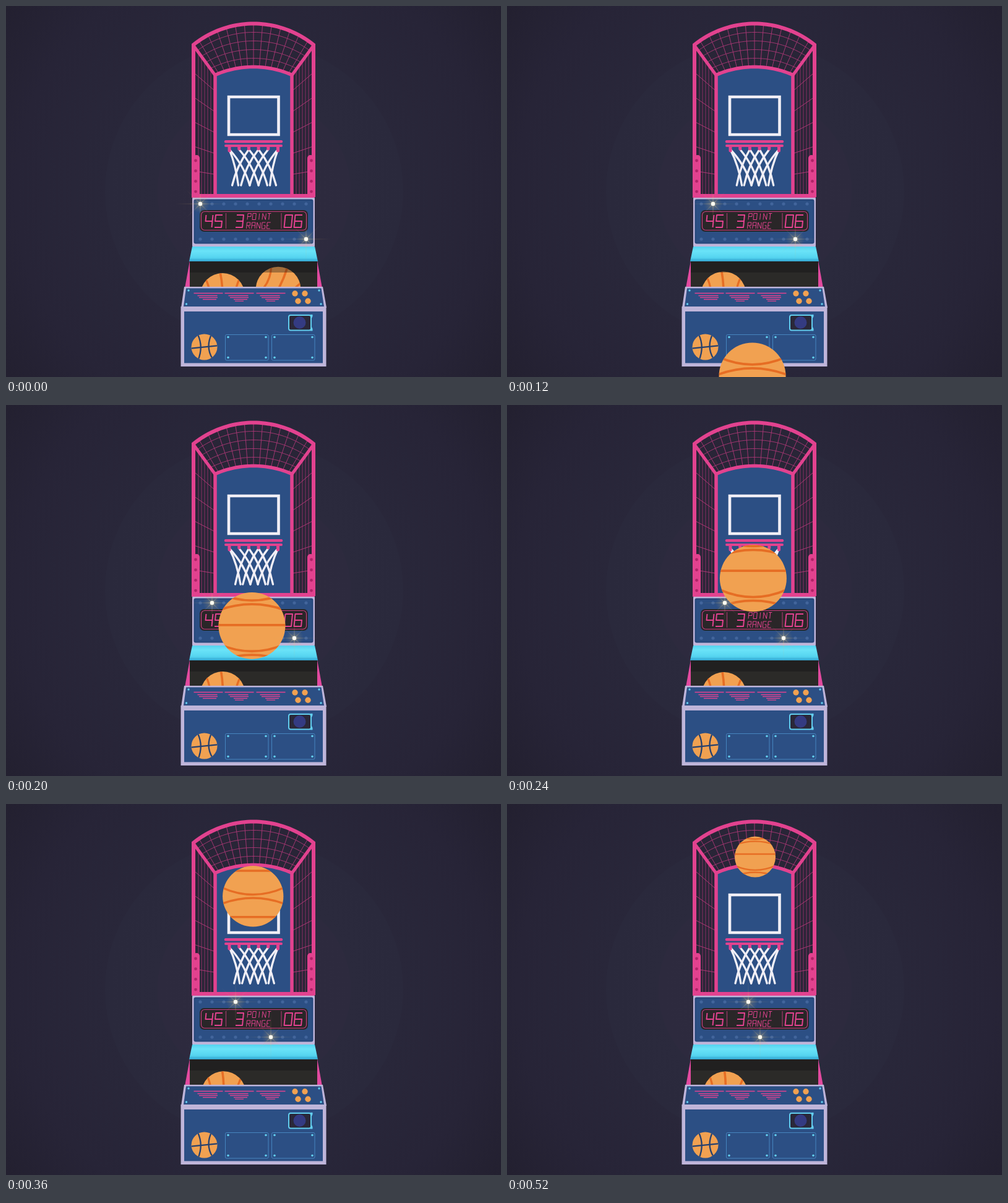
These frames come from a looping animation (800 by 600 pixels, 0.56 s). An HTML page with a canvas:

```html
<!DOCTYPE html>
<html lang="en">
<head>
<meta charset="utf-8">
<title>Arcade hoops</title>
<style>
  html, body { margin: 0; width: 100%; height: 100%; overflow: hidden; background: #242031; }
  canvas { display: block; }
</style>
</head>
<body>
<canvas id="stage" width="800" height="600"></canvas>
<script>
const ctx = document.getElementById('stage').getContext('2d');
const STEP = 40, STEPS = 14, TAU = Math.PI * 2;
const PINK = '#e2428f', BLUE = '#2c4f84', LILAC = '#bfb5da', CYAN = '#62cdee',
      WHITE = '#f1eff6', ORANGE = '#f1a151', SEAM = '#e66d24', DARK = '#2a2839';

const lerp = (a, b, t) => a + (b - a) * t;

// Piecewise linear value through [time, value] keys.
function track(keys, t) {
  const n = keys.findIndex(k => k[0] >= t);
  if (n < 1) return keys[0][1];
  const [t0, v0] = keys[n - 1], [t1, v1] = keys[n];
  return lerp(v0, v1, (t - t0) / (t1 - t0));
}

function stroke(color, width) {
  ctx.strokeStyle = color;
  ctx.lineWidth = width;
  ctx.stroke();
}

function line(points, color, width) {
  ctx.beginPath();
  points.forEach(([x, y]) => ctx.lineTo(x, y));
  stroke(color, width);
}

function poly(points, fill) {
  ctx.beginPath();
  points.forEach(([x, y]) => ctx.lineTo(x, y));
  ctx.closePath();
  ctx.fillStyle = fill;
  ctx.fill();
}

function rect(x, y, w, h, fill) {
  ctx.fillStyle = fill;
  ctx.fillRect(x, y, w, h);
}

function dot(x, y, r, fill) {
  ctx.beginPath();
  ctx.arc(x, y, r, 0, TAU);
  ctx.fillStyle = fill;
  ctx.fill();
}

function box(x, y, w, h, r, fill, border, width) {
  ctx.beginPath();
  ctx.roundRect(x, y, w, h, r);
  if (fill) { ctx.fillStyle = fill; ctx.fill(); }
  if (border) stroke(border, width);
}

function curve(x0, y0, cx, cy, x1, y1, color, width) {
  ctx.beginPath();
  ctx.moveTo(x0, y0);
  ctx.quadraticCurveTo(cx, cy, x1, y1);
  stroke(color, width);
}

// Draws in unit-ball coordinates, clipped to the ball.
function ball(x, y, r, angle, drawSeams) {
  ctx.save();
  ctx.translate(x, y);
  dot(0, 0, r, ORANGE);
  ctx.clip();
  ctx.rotate(angle);
  ctx.scale(r, r);
  drawSeams();
  ctx.restore();
}

function background() {
  const g = ctx.createRadialGradient(401, 300, 0, 401, 300, 500);
  [[0, '#2e2b3f'], [.312, '#2d2a3e'], [.313, '#2b2a3d'], [.481, '#2a293c'],
   [.482, '#29273a'], [.77, '#272437'], [1, '#232030']].forEach(s => g.addColorStop(...s));
  rect(0, 0, 800, 600, g);
}

// Height of the cage roof: s = 0 is the front arch, s = 1 the back arch.
function roof(u, s) {
  const x = u * lerp(97, 62, s), r = 154.5;
  return [400 + x, lerp(183, 253, s) - Math.sqrt(r * r - x * x)];
}

function arch(s) {
  return Array.from({ length: 41 }, (_, n) => roof(n / 20 - 1, s));
}

function cage() {
  const mesh = '#ad3876';
  poly([...arch(0), [497, 308], [303, 308]], '#292537');
  for (let n = -6; n <= 6; n++) line([roof(n / 6.6, 0), roof(n / 6.6, 1)], mesh, .9);
  for (let s = .2; s < .9; s += .2) line(arch(s), mesh, .9);

  for (const side of [-1, 1]) {
    const X = x => 400 + side * (400 - x);
    for (let x = 311; x < 335; x += 5) line([[X(x), 64 + (x - 303) * 1.37], [X(x), 305]], '#8a3165', 1);
    for (let n = 0; n < 5; n++) line([[X(305), 109 + n * 39.5], [X(336), 136 + n * 34]], mesh, 1);
  }

  poly([...arch(1), [462, 306], [338, 306]], BLUE);
  line([[338, 306], ...arch(1), [462, 306]], PINK, 5.5);
  for (const side of [-1, 1]) {
    const X = d => 400 + side * d;
    line([[X(97), 64], [X(62), 112]], PINK, 5);
    box(side < 0 ? 303 : 487, 241, 10, 68, [5, 5, 0, 0], PINK);
  }
  line([[303, 309], ...arch(0), [497, 309]], PINK, 6);
  rect(300, 304, 199, 6, PINK);
  for (const x of [306.5, 493.5])
    for (let n = 0; n < 4; n++) dot(x, 250 + n * 16.7, 2.4, '#b02468');
}

function hoop(i) {
  box(360, 147, 80.5, 61, 0, null, WHITE, 4.6);
  const half = track([[0, 35.5], [2, 30], [4, 29.5], [6, 31.5], [8, 32.5], [11, 32], [13, 32]], i);
  const top = n => 361 + n * 15.7, low = n => 401 + half * (n / 2.5 - 1);
  const strand = (a, b) => curve(top(a), 232, lerp(top(a), low(b), .72), 258, low(b), 290, WHITE, 3.3);
  ctx.lineCap = 'round';
  for (let n = 0; n < 4; n++) { strand(n, n + 2); strand(n + 2, n); }
  strand(0, .7);
  strand(5, 4.3);
  for (let n = 0; n < 6; n++) line([[top(n), 228], [top(n), n % 5 ? 231 : 234]], PINK, 5);
  line([[355, 219.3], [445, 219.3]], PINK, 4.4);
  line([[355, 226], [445, 226]], PINK, 4);
  ctx.lineCap = 'butt';
}

// Segment display: each glyph is a set of polylines on a 2 by 4 grid.
const GLYPHS = {
  0: '0020240400', 3: '00202404 0222', 4: '000222 2024', 5: '200002222404', 6: '200004242202',
  P: '0400202202', O: '0020240400', I: '1014', N: '04002420', T: '0020 1014',
  R: '0400202202 1224', A: '04002024 0222', G: '200004242212', E: '20000424 0212'
};

function segments(text, x, y, w, h, gap, width) {
  [...text].forEach((ch, n) => GLYPHS[ch].split(' ').forEach(path => {
    line(path.match(/../g).map(([px, py]) =>
      [x + n * gap + px * w / 2 + (4 - py) * h * .025, y + py * h / 4]), PINK, width);
  }));
}

function marquee() {
  box(301, 310, 198, 79, 1, LILAC);
  box(303.5, 312.5, 193, 72, 3, '#26477a');
  box(305.5, 315, 189, 67.5, 2, BLUE);
  for (let n = 0; n < 10; n++) for (const y of [320, 377]) dot(314 + n * 19, y, 2.6, '#42659c');
  box(313, 330, 175, 35, 7, '#2a2628');
  box(315.5, 332.5, 170, 30, 5.5, null, '#c43c7e', 1.2);
  for (const x of [355.5, 445]) line([[x, 335], [x, 360]], '#a3386c', 1.2);
  ctx.lineJoin = 'round';
  segments('45', 321.5, 338, 11, 20, 15.5, 2);
  segments('3', 371, 338, 11, 20, 16, 2);
  segments('06', 449.5, 338, 11.5, 20, 16, 2);
  segments('POINT', 390, 335.5, 5.4, 10, 8, 1);
  segments('RANGE', 388.5, 350, 5.4, 10, 8.2, 1);
  ctx.lineJoin = 'miter';
}

function traySeams() {
  curve(-.1, -1, .1, 0, -.1, 1, SEAM, .1);
  curve(.85, -.9, .3, 0, .85, .9, SEAM, .09);
  curve(-.85, -.9, -.3, 0, -.85, .9, SEAM, .09);
}

function tray(i) {
  const g = ctx.createLinearGradient(0, 389, 0, 413);
  [[0, '#55d3f0'], [.3, '#6ae3f8'], [.75, '#55d4f0'], [.9, '#3cb5dc'], [1, '#38a9d2']]
    .forEach(s => g.addColorStop(...s));
  poly([[297, 412], [503, 412], [511, 456], [289, 456]], '#e24a9f');
  poly([[301, 389], [499, 389], [504, 413], [296, 413]], g);
  ctx.save();
  ctx.beginPath();
  ctx.rect(297, 413, 206, 42);
  ctx.clip();
  rect(297, 413, 206, 42, '#2b2a28');
  const leftY = track([[0, 468], [2, 464.8], [4, 466], [6, 468], [13, 468.6]], i);
  ball(350 + Math.max(0, i - 4) * .33, leftY, 36, i * .005, traySeams);
  ball(440, 458 + i * 15.6, 36.3, .5 - i * .15, traySeams);
  rect(297, 413, 206, 18, 'rgba(16,16,18,.35)');
  ctx.restore();
}

function controls() {
  poly([[288, 454], [512, 454], [518, 488], [283, 488]], LILAC);
  poly([[291, 456.5], [509.5, 456.5], [514, 486], [287, 486]], BLUE);
  for (const [x, y] of [[295, 460], [506, 460], [291.5, 482], [509, 482]]) dot(x, y, 1.7, CYAN);
  [327, 377, 428].forEach((x, n) => {
    [[464.5, 0, 23.5], [468.5, -1.5, 16], [471.5, 0, 15], [474.5, 2, 11]].forEach(([y, dx, w]) =>
      line([[x + dx - w, y], [x + dx + w, y]], PINK, 1.4));
    if (n) line([[x - 7, 477.2], [x + 7, 477.2]], PINK, 1.2);
  });
  for (const [x, y] of [[467, 465], [483, 465], [472, 477.3], [488, 477.3]]) dot(x, y, 4.7, ORANGE);
}

function cabinet() {
  rect(282.5, 486, 235, 97, LILAC);
  rect(288, 494, 224, 83.5, BLUE);
  box(457, 500, 36, 24.5, 3, DARK, CYAN, 2);
  poly([[492, 499], [495.5, 499], [495.5, 502], [494, 505], [494, 519], [495.5, 522], [495.5, 525.5], [492, 525.5]], CYAN);
  dot(474.5, 512, 10, '#343b82');

  const seam = '#26416f';
  ball(320.5, 551.5, 21, -.1, () => {
    line([[-1, 0], [1, 0]], seam, .11);
    curve(-.4, -1, -.05, 0, -.6, 1, seam, .11);
    curve(.7, -1, .05, 0, .55, 1, seam, .11);
  });

  for (const x of [354.5, 429.5]) {
    box(x, 531.5, 69.5, 41.5, 2, null, '#4685bf', 1);
    for (const dx of [4.5, 65.5]) for (const y of [535.5, 568.5]) dot(x + dx, y, 1.8, CYAN);
  }
}

function flare(x, y) {
  ctx.save();
  ctx.translate(x, y);
  const glow = (r, a) => {
    const g = ctx.createRadialGradient(0, 0, 0, 0, 0, r);
    g.addColorStop(0, `rgba(255,230,160,${a})`);
    g.addColorStop(.4, `rgba(225,185,110,${a * .35})`);
    g.addColorStop(1, 'rgba(200,160,90,0)');
    return g;
  };
  dot(0, 0, 15, glow(15, .5));
  for (let n = 0; n < 8; n++) {
    const a = n * TAU / 8, len = n % 2 ? 32 : 40;
    line([[0, 0], [Math.cos(a) * len, Math.sin(a) * len]], glow(len, .32), 1.4);
  }
  dot(0, 0, 3.2, '#fffdf2');
  ctx.restore();
}

function thrownBall(i) {
  if (i < 3) return;
  const y = 57.5 + 402.5 * Math.pow(.744, i - 4);
  const r = track([[0, 54], [7, 54], [8, 53], [11, 41.5], [13, 33]], i);
  const period = 1.52, scroll = .185 - .205 * (i - 4);
  ball(397 + (i - 4) * .45, y, r, 0, () => {
    for (let n = -1; n < 4; n++) {
      const s = scroll + n * period, down = s + .785, up = down + .11;
      line([[-1, s], [1, s]], SEAM, .07);
      curve(-1, down - .22, 0, down + .22, 1, down - .22, SEAM, .07);
      curve(-1, up + .18, 0, up - .18, 1, up + .18, SEAM, .07);
    }
  });
}

function frame() {
  const i = Math.floor(performance.now() / STEP) % STEPS;
  const lamp = Math.floor(i / 3) * 19;
  background();
  cage();
  hoop(i);
  marquee();
  tray(i);
  controls();
  cabinet();
  thrownBall(i);
  flare(314 + lamp, 320);
  flare(485 - lamp, 377);
  requestAnimationFrame(frame);
}
frame();
</script>
</body>
</html>
```
